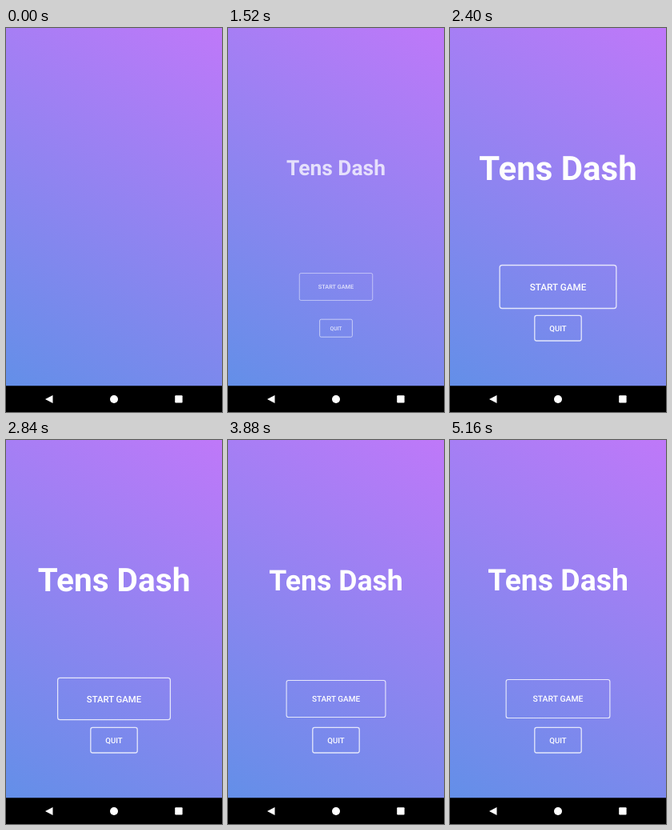
These frames come from a looping animation (270 by 480 pixels, 5.2 s). An HTML page:

```html
<!DOCTYPE html>
<html lang="en">
<head>
<meta charset="utf-8">
<title>Tens Dash</title>
<style>
  html, body { margin: 0; width: 100%; height: 100%; overflow: hidden; background: #000; }
  svg { display: block; width: 100vw; height: 100vh; }
  text { font-family: Roboto, sans-serif; font-weight: 500; fill: #fff; text-anchor: middle; text-rendering: geometricPrecision; }
  .frame { fill: none; stroke: #fff; stroke-opacity: .8; stroke-width: 1.3; }
</style>
</head>
<body>
<svg viewBox="0 0 270 480">
  <defs>
    <linearGradient id="sky" gradientUnits="userSpaceOnUse" x1="270" y1="0" x2="0" y2="447">
      <stop offset="0" stop-color="#bf78f9"/>
      <stop offset="1" stop-color="#638fe8"/>
    </linearGradient>
  </defs>
  <rect width="270" height="447.5" fill="url(#sky)"/>

  <g id="title">
    <text y="15" font-size="42.3" style="font-weight:700">Tens Dash</text>
  </g>
  <g id="start">
    <rect class="frame" x="-73.4" y="-27.2" width="146.8" height="54.4" rx="3"/>
    <text y="4.3" font-size="11.8">START GAME</text>
  </g>
  <g id="quit">
    <rect class="frame" x="-29.2" y="-15.8" width="58.4" height="31.6" rx="2.5"/>
    <text y="3.4" font-size="9.6">QUIT</text>
  </g>

  <rect y="447.5" width="270" height="32.5"/>
  <g fill="#fff">
    <path d="M49 464 L58.5 459 V469 Z"/>
    <circle cx="135" cy="464" r="5"/>
    <rect x="211.2" y="459.2" width="9.4" height="9.4" rx="1"/>
  </g>
</svg>
<script>
  const LOOP = 5200, STEP = 40;
  const ENTER = 128, PEAK = 2532, PULSE = 2060, QUIT_END = 2340;

  const ease = (t, from, to) => {
    const p = Math.min(1, Math.max(0, (t - from) / (to - from)));
    return (1 - Math.cos(Math.PI * p)) / 2;
  };

  const pulse = t => 0.9 + 0.1 * Math.cos(2 * Math.PI * (t - PEAK) / PULSE);

  function place(id, y, scale, shown) {
    const node = document.getElementById(id);
    node.setAttribute("transform", `translate(135 ${y}) scale(${scale})`);
    node.setAttribute("opacity", shown ** 0.6);
  }

  function draw(t) {
    const grow = ease(t, ENTER, PEAK);
    const main = t < PEAK ? grow : pulse(t);
    const quit = ease(t, ENTER, QUIT_END);
    place("title", 175, main, grow);
    place("start", 323.5, main, grow);
    place("quit", 375.2, quit, quit);
  }

  const begin = performance.now();
  function tick() {
    const t = (performance.now() - begin) % LOOP;
    draw(Math.floor(t / STEP) * STEP);
    requestAnimationFrame(tick);
  }
  tick();
</script>
</body>
</html>
```
